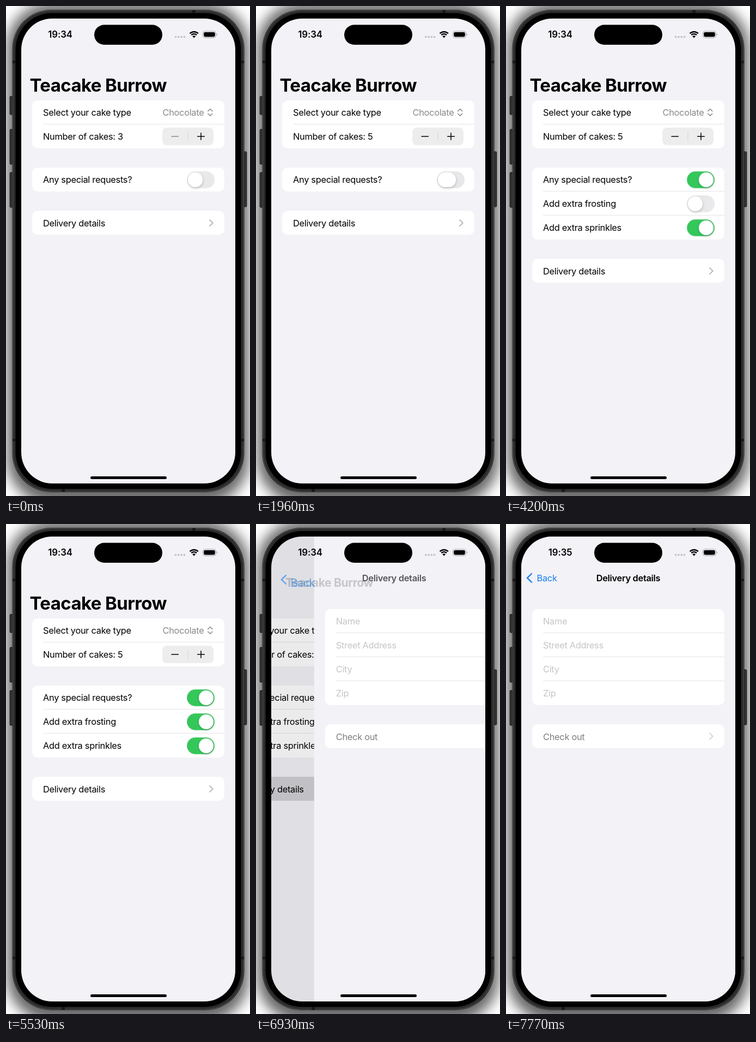
Recreate the animation shown at these times as an HTML page. Size 448 by 898 pixels, loop 8000 ms.

```html
<!DOCTYPE html>
<html lang="en">
<head>
<meta charset="utf-8">
<title>Cake order form</title>
<style>
html, body { margin: 0; width: 100%; height: 100%; overflow: hidden; background: #fff; }
svg { display: block; width: 100vw; height: 100vh; }
text {
  font: 400 16.4px Inter, "Noto Sans", sans-serif;
  font-optical-sizing: none;
  letter-spacing: -0.3px;
  white-space: pre;
}
.semi { font-weight: 600; }
.clock { font-size: 16.8px; letter-spacing: -0.1px; }
.big { font-size: 33px; font-weight: 700; letter-spacing: -0.6px; }
.line { fill: none; stroke-linecap: round; stroke-linejoin: round; }
</style>
</head>
<body>
<svg id="stage" viewBox="0 0 448 898" xmlns="http://www.w3.org/2000/svg"></svg>
<script>
const LOOP = 8000, STEP = 70;
const TAPS = [350, 700];
const SWITCH = { special: 1890, sprinkles: 3500, frosting: 4340 };
const PUSH = 6753, PUSH_END = 7280, MINUTE = 7770;
const BG = '#f2f2f7', GREY = '#8a8a8e', LIGHT = '#c5c5c8', BLUE = '#1a7fec';

// ---- drawing helpers ----
const rect = (x, y, w, h, r, fill, more = '') =>
  `<rect x="${x}" y="${y}" width="${w}" height="${h}" rx="${r}" fill="${fill}" ${more}/>`;
const text = (x, y, s, fill = '#000', more = '') =>
  `<text x="${x}" y="${y}" fill="${fill}" ${more}>${s}</text>`;
const line = (d, color, w, more = '') =>
  `<path class="line" d="${d}" stroke="${color}" stroke-width="${w}" ${more}/>`;
const rule = y => rect(68, y - .4, 333, .8, 0, '#dfdfe2');
const card = (y, h, more = '') => rect(48, y, 353, h, 10, '#fff', more);
const chevron = (y, color) => line(`M374 ${y - 5.5}l5.8 5.5l-5.8 5.5`, color, 1.9);

const toggle = (id, cy) => `
  <g id="${id}" transform="translate(332 ${cy - 15.5})">
    ${rect(0, 0, 51, 31, 15.5, '#e9e9eb')}
    ${rect(.3, .3, 50.4, 30.4, 15.2, '#34c759', 'class="on" stroke="#7fcf95" stroke-width=".6"')}
    ${rect(2, 2, 27, 27, 13.5, '#fff', 'class="knob" filter="url(#drop)"')}
  </g>`;

const defs = `<defs>
  <clipPath id="screen"><rect x="28" y="23" width="393" height="852" rx="57"/></clipPath>
  <clipPath id="rows"><rect id="rowsBox" x="48" y="296" width="353" height="44" rx="10"/></clipPath>
  <filter id="soft" x="-20%" y="-20%" width="140%" height="140%"><feGaussianBlur stdDeviation="12"/></filter>
  <filter id="drop" x="-40%" y="-40%" width="180%" height="190%">
    <feDropShadow dx="0.6" dy="2" stdDeviation="2" flood-color="#000" flood-opacity=".2"/>
  </filter>
</defs>`;

const sideButton = (x, y, h) => rect(x, y, 5, h, 1.4, '#343434', 'stroke="#0c0c0c" stroke-width=".9"');

const phone = `
  ${rect(0, 0, 448, 898, 0, '#fff')}
  ${rect(2, -6, 444, 918, 82, '#000', 'opacity=".6" filter="url(#soft)"')}
  ${sideButton(7.2, 165.5, 33.5)}${sideButton(7.2, 226, 64)}${sideButton(7.2, 305, 64)}
  ${sideButton(436.8, 267, 101)}
  ${rect(11.5, 7, 426, 884, 72, '#101010')}
  ${rect(12.7, 8.2, 423.6, 881.6, 71, '#2b2b2b', 'stroke="#686868" stroke-width=".9"')}
  ${rect(12.4, 100, 5, 5, 0, '#181818')}${rect(431.6, 100, 5, 5, 0, '#181818')}
  ${rect(12.4, 793, 5, 5, 0, '#181818')}${rect(431.6, 793, 5, 5, 0, '#181818')}
  ${rect(342, 8, 6, 5, 0, '#181818')}${rect(102, 885, 6, 5, 0, '#181818')}
  ${rect(17.5, 13, 414, 872, 67, '#000')}`;

const mainPage = `
  <g id="main">
    ${card(173, 88)}${rule(216.5)}
    ${text(68, 201, 'Select your cake type')}
    ${text(287.5, 201, 'Chocolate', GREY)}
    ${line('M370.8 192.6l4-3.9l4 3.9M370.8 197.2l4 3.9l4-3.9', GREY, 1.5)}
    ${text(68, 245, '', '#000', 'id="count"')}
    ${rect(287, 223, 94, 32, 8, '#ededee')}
    <path id="press" d="M334 223h39a8 8 0 0 1 8 8v16a8 8 0 0 1-8 8h-39z" fill="#000"/>
    ${rect(333.5, 230, 1, 18, .5, '#d6d6d9')}
    ${line('M304 239h12.4', '#000', 1.5, 'id="minus"')}
    ${line('M351.7 239h12.6M358 232.7v12.6', '#000', 1.5)}
    ${card(296, 44, 'id="requests"')}
    ${text(68, 324, 'Any special requests?')}
    ${toggle('special', 318.5)}
    <g clip-path="url(#rows)"><g id="extras">
      ${rule(339.5)}${rule(383.5)}
      ${text(68, 368, 'Add extra frosting')}${text(68, 412, 'Add extra sprinkles')}
      ${toggle('frosting', 362.5)}${toggle('sprinkles', 406.5)}
    </g></g>
    <g id="delivery">
      ${card(375.2, 44, 'id="deliveryCard"')}
      ${text(68, 403.5, 'Delivery details')}${chevron(397.5, '#b9b9bd')}
    </g>
  </g>
  ${rect(28, 23, 393, 852, 0, '#000', 'id="dim"')}`;

const fields = ['Name', 'Street Address', 'City', 'Zip'];
const formPage = `
  <g id="form">
    ${rect(28, 23, 393, 852, 0, BG)}
    ${card(156, 176)}
    ${fields.map((f, i) => text(68, 184 + 44 * i, f, LIGHT) + (i ? rule(155.5 + 44 * i) : '')).join('')}
    ${card(367, 44)}
    ${text(68, 395.5, 'Check out', '#7e7e82')}${chevron(389, '#d6d6d9')}
  </g>`;

const navBar = `
  <g id="bigTitle">${text(0, 0, 'Teacake Burrow', '#000', 'class="big"')}</g>
  <g id="back">
    ${line('M47 91l-8 7.8l8 7.8', BLUE, 2.4, 'id="arrow"')}
    <g id="backLabel">${text(0, 0, 'Back', BLUE)}</g>
  </g>
  ${text(224.5, 104.8, 'Delivery details', '#000', 'id="navTitle" class="semi" text-anchor="middle"')}`;

const arc = (r, w) => {
  const d = r * Math.SQRT1_2;
  return `<path d="M${345.2 - d} ${58 - d}A${r} ${r} 0 0 1 ${345.2 + d} ${58 - d}" fill="none" stroke="#000" stroke-width="${w}"/>`;
};
const statusBar = `
  ${text(99.6, 58.2, '', '#000', 'id="clock" class="semi clock" text-anchor="middle"')}
  ${rect(162, 34.5, 125, 36.5, 18.25, '#000')}
  ${[0, 1, 2, 3].map(i => `<circle cx="${311.6 + 5.3 * i}" cy="56.6" r="1.9" fill="#c3c3c7"/>`).join('')}
  ${arc(10.8, 2.4)}${arc(6.9, 2.4)}
  <path d="M345.2 58.6l-2.9-3a4.1 4.1 0 0 1 5.8 0z"/>
  ${rect(361.5, 46.2, 24, 12, 3.8, 'none', 'stroke="#a3a3a7" stroke-width="1"')}
  ${rect(363.2, 47.9, 20.6, 8.6, 2.4, '#000')}
  <path d="M387 50.2a2.2 2.2 0 0 1 0 4z" fill="#a3a3a7"/>
  ${rect(155, 862, 140, 5, 2.5, '#000')}`;

document.getElementById('stage').innerHTML = `${defs}${phone}
  <g clip-path="url(#screen)">
    ${rect(28, 23, 393, 852, 0, BG)}${mainPage}${formPage}${navBar}${statusBar}
  </g>`;

// ---- animation ----
const $ = id => document.getElementById(id);
const set = (node, attrs) => { for (const k in attrs) node.setAttribute(k, attrs[k]); };
const clamp = v => Math.min(1, Math.max(0, v));
const span = (t, from, length) => clamp((t - from) / length);
const smooth = p => p * p * (3 - 2 * p);
const easeOut = p => 1 - (1 - p) ** 3;
const mix = (a, b, p) => a + (b - a) * p;

function drawSwitch(id, t) {
  const s = t - SWITCH[id];
  const slide = smooth(span(s, 60, 330));
  const stretch = 6 * (s < 0 ? 0 : smooth(span(s, -70, 140)) * (1 - smooth(span(s, 210, 320))));
  const w = 27 + stretch;
  set($(id).querySelector('.knob'), { x: mix(2, 49 - w, slide), width: w });
  set($(id).querySelector('.on'), { opacity: smooth(span(s, 60, 300)) });
}

function drawStepper(t) {
  const n = 3 + TAPS.filter(tap => t >= tap).length;
  $('count').textContent = 'Number of cakes: ' + n;
  set($('minus'), { stroke: n > 3 ? '#000' : GREY });
  const glow = TAPS.map(tap => t < tap ? 0 : 1 - span(t, tap + 40, 140));
  set($('press'), { opacity: .08 * Math.max(...glow) });
}

function drawRequests(t) {
  const open = easeOut(span(t, SWITCH.special + 120, 560));
  const h = 44 + 88 * open;
  set($('requests'), { height: h });
  set($('rowsBox'), { height: h });
  set($('extras'), { opacity: open });
  set($('delivery'), { transform: `translate(0 ${88 * open})` });
}

function drawPush(t) {
  // critically damped spring
  const k = Math.max(0, t - PUSH) * .0169;
  const p = t >= PUSH_END ? 1 : 1 - (1 + k) * Math.exp(-k);
  const off = 393 * (1 - p);
  set($('main'), { transform: `translate(${-118 * p} 0)` });
  set($('dim'), { opacity: .1 * p });
  set($('form'), { transform: `translate(${off} 0)` });
  set($('deliveryCard'), { fill: p > 0 ? '#d1d1d6' : '#fff' });
  set($('bigTitle'), {
    transform: `translate(${mix(43.5, 57, p)} ${mix(157, 104.8, p)}) scale(${mix(1, .55, p)})`,
    opacity: clamp(1 - p * 1.03)
  });
  set($('back'), { opacity: p * p });
  set($('arrow'), { transform: `translate(${off * .1} ${off * .04})` });
  set($('backLabel'), {
    transform: `translate(${mix(44, 56.5, p) + off * .12} ${mix(157, 104.8, p)}) scale(${mix(2, 1, p)})`
  });
  set($('navTitle'), { transform: `translate(${off * .37} 0)`, opacity: p * p });
}

function draw(now) {
  const t = Math.floor((now % LOOP) / STEP + 1e-6) * STEP;
  drawStepper(t);
  Object.keys(SWITCH).forEach(id => drawSwitch(id, t));
  drawRequests(t);
  drawPush(t);
  $('clock').textContent = t >= MINUTE ? '19:35' : '19:34';
}

let start = null;
function tick(now) {
  if (start === null) start = now;
  draw(Math.max(0, now - start));
  requestAnimationFrame(tick);
}
draw(0);
requestAnimationFrame(tick);
</script>
</body>
</html>
```
